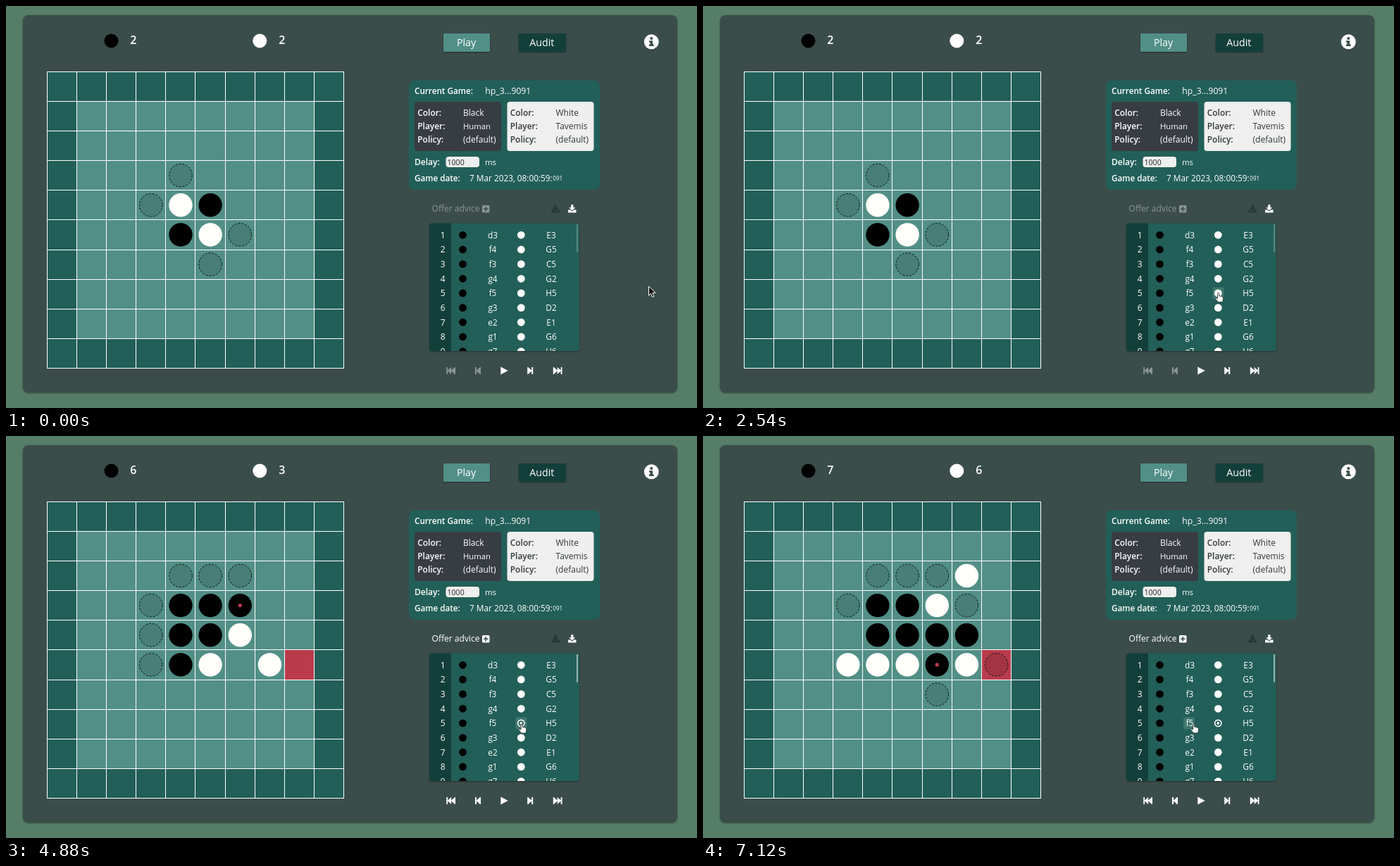
Animation, 981 px wide and 571 px high, one loop 8 s. Source, as an HTML page:

```html
<!DOCTYPE html>
<html lang="en">
<head>
<meta charset="utf-8">
<title>Board game</title>
<style>
html, body { margin: 0; width: 100%; height: 100%; overflow: hidden; background: #567d67; }
svg { display: block; width: 981px; height: 571px; }
text { font-family: "Open Sans", "Noto Sans", sans-serif; font-size: 12px; fill: #fff; }
.b { font-weight: 600; }
.m { text-anchor: middle; }
.sh { filter: drop-shadow(0 1px 1.2px rgba(0,0,0,.4)); }
</style>
</head>
<body>
<svg id="stage" viewBox="0 0 981 571"></svg>
<script>
const NS = 'http://www.w3.org/2000/svg';
const stage = document.getElementById('stage');
const LOOP = 8000, CELL = 42.16, X0 = 58.05, Y0 = 93.05;
const TEAL = '#225f58', LIGHT = '#528f86', DEEP = '#133f3a', RED = '#ba3b4c', SLATE = '#3b4d4b';

function el(tag, attrs, parent = stage) {
  const n = document.createElementNS(NS, tag);
  for (const k in attrs) n.setAttribute(k, attrs[k]);
  parent.appendChild(n);
  return n;
}
const box = (x, y, width, height, fill, rx = 0, p, cls = '') =>
  el('rect', { x, y, width, height, fill, rx, class: cls }, p);
const disc = (cx, cy, r, fill, p) => el('circle', { cx, cy, r, fill }, p);
const path = (d, fill, p) => el('path', { d, fill }, p);
function label(x, y, str, size = 12, cls = '', fill = '#fff', p) {
  const n = el('text', { x, y, class: cls, style: `font-size:${size}px;fill:${fill}` }, p);
  n.textContent = str;
  return n;
}
const show = (n, on) => n.setAttribute('visibility', on ? 'visible' : 'hidden');

// Game rules
const GAME = 'd3E3f4G5f3C5g4G2f5H5g3D2e2E1g1G6g7H6'.match(/../g);
const DIRS = [-11, -10, -9, -1, 1, 9, 10, 11];
const inside = i => i % 10 > 0 && i % 10 < 9 && i > 9 && i < 90;
const square = s => 'abcdefgh'.indexOf(s[0].toLowerCase()) + 1 + 10 * +s[1];

function flips(cells, at, side) {
  if (cells[at]) return [];
  return DIRS.flatMap(d => {
    const run = [];
    let i = at + d;
    while (inside(i) && cells[i] === 3 - side) { run.push(i); i += d; }
    return inside(i) && cells[i] === side ? run : [];
  });
}
function position(cells, side, last) {
  const hints = cells.map((_, i) => i).filter(i => inside(i) && flips(cells, i, side).length);
  return { cells, hints, last };
}
function replay(count) {
  let cells = Array(100).fill(0), side = 1;
  cells[44] = cells[55] = 2;
  cells[45] = cells[54] = 1;
  const list = [position(cells, side, -1)];
  for (const move of GAME.slice(0, count)) {
    const at = square(move);
    cells = cells.slice();
    for (const i of [at, ...flips(cells, at, side)]) cells[i] = side;
    side = 3 - side;
    list.push(position(cells, side, at));
  }
  return list;
}
const positions = replay(9);
const moveTimes = [4300, 4420, 4600, 4700, 4800, 4920, 5060, 5200, 5340];
const CLICK = 4220;

// Panel, scores and buttons
box(24, 13, 929, 536, SLATE, 8, stage, 'sh');
disc(149.5, 49.5, 10, '#000');
disc(360.3, 49.5, 10, '#fff');
const scores = [label(176.3, 54, '', 16, 'b'), label(387.3, 54, '', 16, 'b')];
box(621, 39, 66, 26, LIGHT, 1, stage, 'sh');
box(728, 39, 67, 26, DEEP, 1, stage, 'sh');
label(653.5, 57, 'Play', 14.2, 'm');
label(760.8, 57, 'Audit', 14.2, 'm');
disc(916.3, 50.8, 10.5, '#fff');
disc(916.3, 46, 2.1, SLATE);
path('M912.9 49.2h5.2v5.4h1.6v2.4h-6.8v-2.4h1.5v-3h-1.5z', SLATE);

// Board
box(X0, Y0, CELL * 10, CELL * 10, TEAL);
box(X0 + CELL, Y0 + CELL, CELL * 8, CELL * 8, LIGHT);
const col = i => X0 + CELL * (i % 10), row = i => Y0 + CELL * Math.floor(i / 10);
const midX = i => col(i) + CELL / 2 + .2, midY = i => row(i) + CELL / 2;
const advised = square('h5');
const redCell = box(col(advised), row(advised), CELL, CELL, RED);
let grid = '';
for (let i = 0; i <= 10; i++) {
  const x = Math.floor(X0 + CELL * i) + .5, y = Math.floor(Y0 + CELL * i) + .5;
  grid += `M${x} 93V515M58 ${y}H480`;
}
el('path', { d: grid, stroke: '#fff', fill: 'none' });
const pieces = [];
for (let i = 0; i < 100; i++) {
  if (!inside(i)) continue;
  const cx = midX(i), cy = midY(i);
  const piece = disc(cx, cy, 16.7, '#000');
  const hint = el('circle', { cx, cy, r: 16.3, fill: 'rgba(0,0,0,.12)', stroke: '#0a1413', 'stroke-dasharray': '3 1.9' });
  pieces.push({ i, piece, hint });
}
const mark = disc(0, 0, 2.6, RED);

// Game card
box(572, 105.5, 271, 155.5, TEAL, 8);
label(580, 124.8, 'Current Game:', 11.7, 'b');
label(680.3, 124.8, 'hp_3...9091', 12.2);
function player(x, bg, ink, values) {
  box(x, 136, 123, 70, bg, 4);
  ['Color:', 'Player:', 'Policy:'].forEach((name, i) => {
    const y = 156.2 + i * 19;
    label(x + 4.3, y, name, 11.9, 'b', ink);
    label(x + 69, y, values[i], values[i] === 'Human' ? 11.3 : 12, '', ink);
  });
}
player(580, '#383c43', '#fff', ['Black', 'Human', '(default)']);
player(711.5, '#eeefee', '#34393d', ['White', 'Tavemis', '(default)']);
label(580, 225.8, 'Delay:', 12, 'b');
box(624.5, 214, 47.5, 15, '#eeefee', 4);
label(626.5, 225.7, '1000', 10.6, '', '#222');
label(680, 225.8, 'ms', 11.4);
label(580, 248.8, 'Game date:', 11.7, 'b');
label(658, 248.8, '7 Mar 2023, 08:00:59:', 11.8);
label(776.3, 248.3, '091', 8.1);

// Advice line
const advice = el('g', {});
label(604.5, 292.4, 'Offer advice', 12.05, '', '#fff', advice);
box(676, 283, 10.5, 10.5, '#fff', 1.5, advice);
path('M680.4 285h1.7v2.4h2.4v1.7h-2.4v2.4h-1.7v-2.4h-2.4v-1.7h2.4z', SLATE, advice);
function download(x, fill) {
  path(`M${x - 1.6} 282.2h3.2v4h2.9l-4.5 4.4l-4.5-4.4h2.9z` +
    `M${x - 5.7} 289.4h3.2l2.5 2.3l2.5-2.3h3.2v4h-11.4z`, fill);
}
download(780.2, '#263836');
download(803.8, '#fff');

// Move list
box(601, 308.5, 213, 181.5, TEAL, 4, stage, 'sh');
path('M605 308.5H632V490H605a4 4 0 0 1-4-4V312.5a4 4 0 0 1 4-4z', DEEP);
const clip = el('clipPath', { id: 'list' });
box(601, 308, 213, 182, '#000', 4, clip);
const list = el('g', { 'clip-path': 'url(#list)' });
const hoverBox = box(723.5, 399.5, 16, 17, '#40776f', 2, list);
for (let i = 0; i < 9; i++) {
  const y = 325.3 + i * 20.66;
  label(620.3, y + 4.4, i + 1, 12, 'm', '#fff', list);
  disc(648.5, y, 5.4, '#000', list);
  label(691, y + 4.4, GAME[2 * i], 11.8, 'm', '#fff', list);
  disc(731.3, y, 5.4, '#fff', list);
  label(774, y + 4.4, GAME[2 * i + 1], 11.8, 'm', '#fff', list);
}
const chosen = el('g', {}, list);
disc(731.3, 408, 3.8, TEAL, chosen);
disc(731.3, 408, 1.9, '#fff', chosen);
const thumb = box(810, 310, 2, 40, '#fff', 1);

// Playback controls
const back = el('g', {});
path('M625.3 513h1.8v4.4l5-4.4v4.4l5-4.4h.9v10h-.9l-5-4.4v4.4l-5-4.4v4.4h-1.8z', '#fff', back);
path('M666 513h2v4.4l5-4.4h1v10h-1l-5-4.4v4.4h-2z', '#fff', back);
path('M702.3 512.6l10.4 5.4l-10.4 5.4z', '#fff');
path('M748.2 513h-2v4.4l-5-4.4h-1v10h1l5-4.4v4.4h2z', '#fff');
path('M789.5 513h-1.8v4.4l-5-4.4v4.4l-5-4.4h-.9v10h.9l5-4.4v4.4l5-4.4v4.4h1.8z', '#fff');

// Pointers
const arrow = el('path', {
  d: 'M.5 .5V13.6L3.5 10.9L5.6 15.8L7.9 14.8L5.9 10H10Z',
  fill: '#111', stroke: '#fff', 'stroke-width': 1
});
const hand = el('path', {
  d: 'M3.6 8.6V1.6Q3.6 .4 4.6 .4T5.7 1.6V5Q7.4 4.3 7.7 5.4Q9.2 4.8 9.6 6Q11.4 5.6 11.4 7.3V10.2L10.4 13.6H4.4L.8 9.2Q.2 8 1.4 7.6Z',
  fill: '#fff', stroke: '#1b2423', 'stroke-width': .8
});

const track = [
  [0, 912, 397.5], [300, 911, 398], [420, 909, 399], [540, 907, 399.5], [680, 905, 400],
  [860, 902, 400], [940, 897, 400], [1000, 891, 400], [1140, 828, 420], [1400, 813, 423],
  [1460, 801, 425], [1540, 787, 425], [1700, 772, 426], [1800, 762.5, 425.5], [1980, 747, 422],
  [2260, 742, 417], [2500, 729, 406], [2540, 727, 407], [2820, 727.3, 408.5],
  [6740, 724, 408.5], [6820, 721, 408.5], [6900, 718, 408.5], [6980, 714.5, 408], [7120, 692, 408.3]
];
const HAND = 2500, HOVER_LEFT = 6900;

let shown = -1;
function drawBoard(n) {
  if (n === shown) return;
  shown = n;
  const { cells, hints, last } = positions[n];
  for (const { i, piece, hint } of pieces) {
    show(piece, cells[i]);
    piece.setAttribute('fill', cells[i] === 2 ? '#fffffb' : '#000');
    show(hint, hints.includes(i));
  }
  scores.forEach((s, k) => s.textContent = cells.filter(c => c === k + 1).length);
  show(mark, last > 0);
  if (last > 0) {
    mark.setAttribute('cx', midX(last));
    mark.setAttribute('cy', midY(last));
  }
}

function draw(t) {
  drawBoard(moveTimes.filter(m => m <= t).length);
  const clicked = t >= CLICK;
  show(redCell, clicked);
  show(chosen, clicked);
  advice.setAttribute('opacity', clicked ? 1 : .4);
  back.setAttribute('opacity', clicked ? 1 : .4);
  thumb.setAttribute('opacity', t >= 3920 ? .55 : .25);
  show(hoverBox, t >= HAND);
  hoverBox.setAttribute('x', t < HOVER_LEFT ? 723.5 : 682);
  const [, x, y] = track.filter(k => k[0] <= t).pop();
  show(arrow, t < HAND);
  show(hand, t >= HAND);
  for (const p of [arrow, hand]) p.setAttribute('transform', `translate(${x} ${y})`);
}

const start = performance.now();
function tick(now) {
  draw(Math.max(0, now - start) % LOOP);
  requestAnimationFrame(tick);
}
draw(0);
requestAnimationFrame(tick);
</script>
</body>
</html>
```
